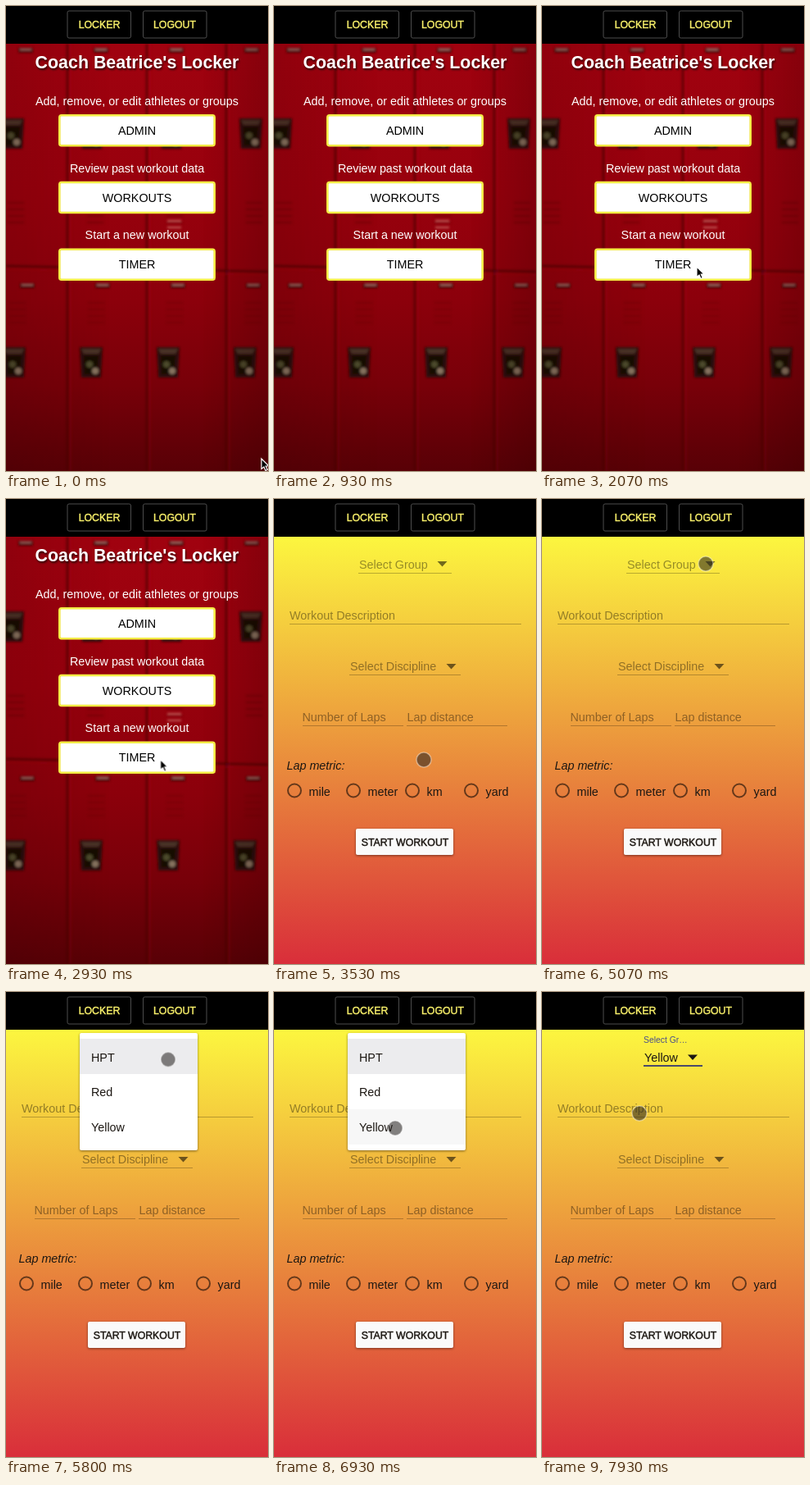
An HTML page that plays this animation: 320 by 567 pixels, repeating every 8000 ms.

```html
<!DOCTYPE html>
<html lang="en">
<head>
<meta charset="utf-8">
<title>Workout timer</title>
<style>
  html, body { margin: 0; width: 100%; height: 100%; overflow: hidden; background: #000; }
  svg { display: block; width: 100vw; height: 100vh; }
  text { font: 14.35px "Liberation Sans", Arial, sans-serif; }
  .mid { text-anchor: middle; }
  .caps { font-size: 12.3px; stroke-width: .45px; }
  .nav { fill: #f8f06a; stroke: #f8f06a; }
  .nav-box { fill: none; stroke: #4c4c4c; }
  .title { font-size: 21.4px; font-weight: bold; fill: #fff; filter: drop-shadow(1px 2px 1px #000a); }
  .intro { fill: #fff; }
  .choice { fill: #fff; stroke: #f3ec45; stroke-width: 2.6px; }
  .hint { fill: #000; fill-opacity: .4; }
  .rule { stroke: #000; stroke-opacity: .25; }
  .ink { fill: #1c1712; }
  .radio { fill: none; stroke: #000; stroke-opacity: .56; stroke-width: 2px; }
  .raised { filter: drop-shadow(0 1px 1.5px #0007); }

  .home, .form, .arrow, .touch, .menu, .empty, .chosen, .float, .hover-yellow {
    animation: 8s linear infinite both;
  }
  .home { animation-name: home; animation-timing-function: step-end; }
  .form, .touch { animation-name: form; animation-timing-function: step-end; }
  .arrow { animation-name: arrow; }
  .touch-move { animation: touch 8s ease-in-out infinite both; }
  .menu { animation-name: menu; transform-origin: 162px 79px; }
  .empty { animation-name: empty; animation-timing-function: step-end; }
  .chosen { animation-name: chosen; animation-timing-function: step-end; }
  .float { animation-name: float; transform-origin: 124px 61px; }
  .hover-yellow { animation-name: hover; animation-timing-function: step-end; }

  @keyframes home { 0% { opacity: 1 } 44.1%, 100% { opacity: 0 } }
  @keyframes form { 0% { opacity: 0 } 44.1%, 100% { opacity: 1 } }
  @keyframes arrow {
    0%, .8% { transform: translate(312px, 552px) }
    4% { transform: translate(326px, 574px) }
    21% { transform: translate(326px, 440px); animation-timing-function: ease-out }
    25.5%, 36% { transform: translate(189px, 318px) }
    40%, 100% { transform: translate(186px, 316px) }
  }
  @keyframes touch {
    0%, 52% { transform: translate(183px, 318px) }
    61.5%, 71% { transform: translate(200px, 79px) }
    82%, 91% { transform: translate(148px, 166px) }
    97.5% { transform: translate(185px, 157px); animation-timing-function: linear }
    99.12%, 100% { transform: translate(119px, 148px) }
  }
  @keyframes menu {
    0%, 66.5% { opacity: 0; transform: scale(.75) }
    68.8%, 89% { opacity: 1; transform: none }
    91%, 100% { opacity: 0; transform: none }
  }
  @keyframes empty { 0% { opacity: 1 } 67%, 100% { opacity: 0 } }
  @keyframes chosen { 0% { opacity: 0 } 89%, 100% { opacity: 1 } }
  @keyframes float {
    0%, 89% { transform: translateY(20px) scale(1.35) }
    92%, 100% { transform: none }
  }
  @keyframes hover { 0% { opacity: 0 } 79.5%, 100% { opacity: 1 } }
</style>
</head>
<body>
<svg viewBox="0 0 320 567">
  <defs>
    <linearGradient id="metal" x2="0" y2="1">
      <stop offset="0" stop-color="#a0020f"/>
      <stop offset=".35" stop-color="#98010d"/>
      <stop offset=".6" stop-color="#8c000b"/>
      <stop offset=".8" stop-color="#780009"/>
      <stop offset="1" stop-color="#580006"/>
    </linearGradient>
    <linearGradient id="shade">
      <stop offset="0" stop-color="#200" stop-opacity=".12"/>
      <stop offset=".4" stop-color="#200" stop-opacity="0"/>
      <stop offset=".75" stop-color="#200" stop-opacity="0"/>
      <stop offset="1" stop-color="#200" stop-opacity=".2"/>
    </linearGradient>
    <linearGradient id="sunset" x2="0" y2="1">
      <stop offset="0" stop-color="#fcf63f"/>
      <stop offset="1" stop-color="#d92e3a"/>
    </linearGradient>
    <filter id="soft"><feGaussianBlur stdDeviation="1.5"/></filter>
    <g id="latch">
      <path d="M-14-19H14L12 18H-12Z" fill="#2b0d09"/>
      <path d="M-12-17H12L9-11H-9Z" fill="#4a3028"/>
      <path d="M-9-9H9L7 14H-8Z" fill="#120806"/>
      <circle cx="-2" cy="2" r="4" fill="#4c4a2c"/>
      <circle cx="5" cy="10" r="4" fill="#86735e"/>
    </g>
    <g id="plate">
      <rect x="-9" y="-3" width="18" height="6" rx="1" fill="#4d1010"/>
      <path d="M-7-1H7" stroke="#a66660" stroke-width="2"/>
    </g>
    <path id="vent" d="M-10 0H10M-10 8H10M-10 16H10M-10 24H10" stroke="#5c0209" stroke-width="1.6"/>
    <path id="caret" d="M-6-3H6L0 3.5Z"/>
  </defs>

  <g class="home">
    <rect y="46" width="320" height="521" fill="url(#metal)"/>
    <g id="lockers" filter="url(#soft)"></g>
    <rect y="46" width="320" height="521" fill="url(#shade)"/>
    <text class="title mid" x="160" y="76">Coach Beatrice's Locker</text>
    <g id="choices"></g>
  </g>

  <g class="form">
    <rect y="46" width="320" height="521" fill="url(#sunset)"/>
    <g class="empty">
      <text class="hint" x="104" y="84.5">Select Group</text>
      <path class="rule" d="M103 90.5H217"/>
      <use href="#caret" x="205.5" y="79" opacity=".55"/>
    </g>
    <g class="chosen">
      <text class="float" x="124" y="61.5" style="font-size:10.4px" fill="#4a4f8c">Select Gr…</text>
      <text class="ink" x="125" y="84.5">Yellow</text>
      <path d="M124 90H196" stroke="#4a4a6a" stroke-width="2"/>
      <use href="#caret" x="184" y="79.5" fill="#1c1712"/>
    </g>
    <text class="hint" x="19" y="147">Workout Description</text>
    <text class="hint" x="93" y="209">Select Discipline</text>
    <text class="hint" x="34.5" y="271">Number of Laps</text>
    <text class="hint" x="162.5" y="271">Lap distance</text>
    <path class="rule" d="M19 152.5H302M92 214.5H228M35 276.5H158M162 276.5H285"/>
    <use href="#caret" x="216.5" y="204" opacity=".55"/>
    <text class="ink" x="15.5" y="330" style="font-style:italic">Lap metric:</text>
    <g id="radios"></g>
    <rect class="raised" x="100" y="402" width="119" height="32" rx="2" fill="#fafafa"/>
    <text class="caps ink mid" x="160" y="422.5" stroke="#1c1712">START WORKOUT</text>

    <g class="menu">
      <rect class="raised" x="90" y="50" width="144" height="143" rx="2" fill="#fff"/>
      <rect x="90" y="57" width="144" height="43" fill="#ececee"/>
      <rect class="hover-yellow" x="90" y="143" width="144" height="43" fill="#f7f7f7"/>
      <text class="ink" x="104" y="84.5">HPT</text>
      <text class="ink" x="104" y="127">Red</text>
      <text class="ink" x="104" y="170">Yellow</text>
    </g>
  </g>

  <rect width="320" height="46"/>
  <rect class="nav-box" x="75" y="6" width="77.5" height="33" rx="2"/>
  <rect class="nav-box" x="167.5" y="6" width="77.5" height="33" rx="2"/>
  <text class="caps nav mid" x="114" y="26.5">LOCKER</text>
  <text class="caps nav mid" x="206" y="26.5">LOGOUT</text>

  <g class="home">
    <path class="arrow" d="M0 0V12.5L3 10L5 14.5L7.3 13.5L5.3 9H9Z" stroke="#fff" stroke-width="1.2"/>
  </g>
  <g class="touch">
    <circle class="touch-move" r="9" fill="#262422" fill-opacity=".57" stroke="#fff" stroke-opacity=".4" stroke-width="1.5"/>
  </g>
</svg>
<script>
  const fill = (id, markup) => { document.getElementById(id).innerHTML = markup; };
  const use = (id, x, y) => `<use href="#${id}" x="${x}" y="${y}"/>`;
  const columns = [0, 1, 2, 3];

  fill('lockers', columns.map(i => {
    const seam = -22 + 97 * i;
    const latch = 10 + 94 * i;
    return `<path d="M${seam} 46V567" stroke="#4c0208" stroke-width="2.5" stroke-opacity=".8"/>
      <path d="M${seam + 4} 46V567" stroke="#b81522" stroke-opacity=".35"/>` +
      use('latch', latch - 2 + i * 3, 156) + use('latch', latch, 435) +
      use('plate', 24 + 92 * i, 54) + use('plate', 26 + 92 * i, 341) +
      `<g opacity=".6">${use('vent', 12 + 97 * i, 240)}</g>
      <g opacity=".4">${use('vent', 14 + 96 * i, 362)}</g>`;
  }).join('') +
    `<path d="M0 317L320 324" stroke="#4c0208" stroke-width="2.5" stroke-opacity=".8"/>
     <path d="M0 321L320 328" stroke="#b01520" stroke-opacity=".4"/>
     <path d="M197 262H214M197 270H214" stroke="#c4605c" stroke-width="2"/>`);

  const choices = [
    ['Add, remove, or edit athletes or groups', 'ADMIN'],
    ['Review past workout data', 'WORKOUTS'],
    ['Start a new workout', 'TIMER']
  ];
  fill('choices', choices.map(([intro, label], i) => {
    const y = 81.7 * i;
    return `<text class="intro mid" x="160" y="${121 + y}">${intro}</text>
      <rect class="choice" x="65.3" y="${133.3 + y}" width="189.4" height="37" rx="2.5"/>
      <text class="mid" x="160" y="${157 + y}">${label}</text>`;
  }).join(''));

  fill('radios', ['mile', 'meter', 'km', 'yard'].map((unit, i) => {
    const x = 25 + 72 * i;
    return `<circle class="radio" cx="${x}" cy="355.5" r="8"/>
      <text class="ink" x="${x + 17.5}" y="361.5">${unit}</text>`;
  }).join(''));
</script>
</body>
</html>
```
